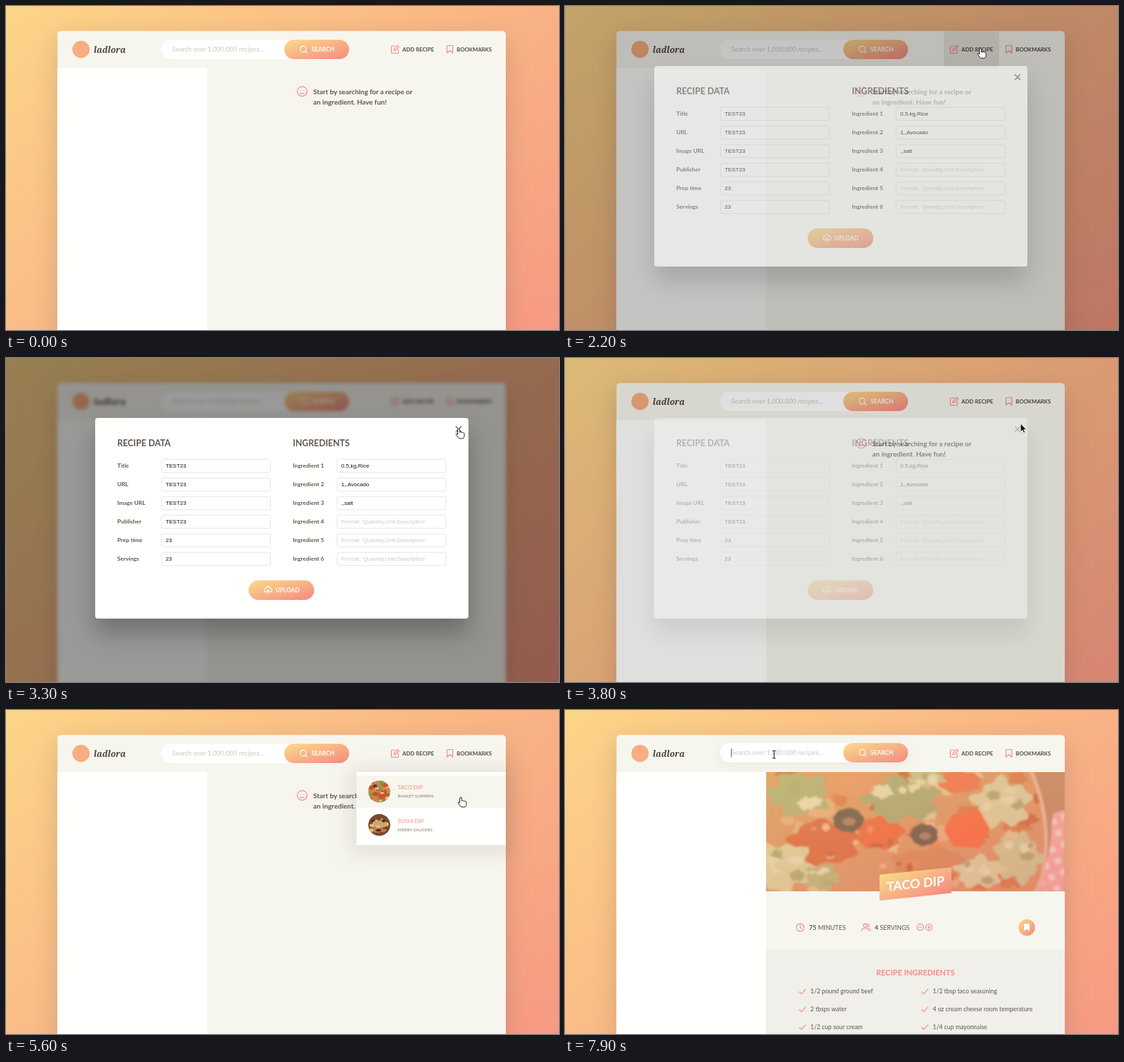
An HTML page for the animation above (8000 ms loop, 800x470 px).

```html
<!DOCTYPE html>
<html lang="en">
<head>
<meta charset="utf-8">
<title>Recipe search</title>
<style>
  html, body { margin: 0; width: 100%; height: 100%; overflow: hidden; }
  #stage { position: relative; width: 800px; height: 470px; overflow: hidden; }
  #page { position: absolute; width: 800px; height: 704px; background: linear-gradient(to right bottom, #fcd588, #f58d82); }
  svg, #veil { position: absolute; left: 0; top: 0; width: 800px; height: 470px; }
  #veil { background: rgba(0, 0, 0, .4); }
  text { font-family: Lato, "Open Sans", sans-serif; fill: #615551; white-space: pre; }
  .b { font-weight: 700; }
  .nav { font-weight: 700; fill: #544a46; }
  .w { fill: #fff; }
  .pink { fill: #f38e82; }
  .sub { font-size: 6.4px; fill: #857975; }
  .in { font: 8.1px "Liberation Sans", Arial, sans-serif; fill: #111; }
  .hint { fill: #c9c9c9; }
  .ic { fill: none; stroke: #f38e82; stroke-width: 1.2; stroke-linecap: round; stroke-linejoin: round; }
  .wi { stroke: #fff; }
  .card { filter: drop-shadow(0 11px 17px rgba(97, 85, 81, .24)); }
  .pop { filter: blur(13.5px); fill: rgba(97, 85, 81, .12); }
  .box { filter: drop-shadow(0 22px 17px rgba(0, 0, 0, .26)); }
</style>
</head>
<body>
<div id="stage">
  <div id="page">
    <svg viewBox="0 0 800 470">
      <defs>
        <linearGradient id="warm" x2="1" y2="1"><stop stop-color="#fbdb89"/><stop offset="1" stop-color="#f48982"/></linearGradient>
        <clipPath id="photoClip"><path d="M291 90H723V263H291Z"/></clipPath>
        <clipPath id="thumbClip"><circle r="16"/></clipPath>
        <filter id="soft"><feGaussianBlur stdDeviation="1.8"/></filter>
        <pattern id="check" width="18" height="18" patternUnits="userSpaceOnUse" patternTransform="rotate(-25)">
          <path fill="#f3d3cd" d="M0 0H18V18H0Z"/><path fill="#ea7f7d" opacity=".55" d="M0 0H9V18H0ZM0 0H18V9H0Z"/>
        </pattern>
      </defs>
      <rect class="card" x="74.5" y="36.3" width="648.5" height="632" rx="5" fill="#f7f6ee"/>
      <path fill="#fffffe" d="M74.500 90.300H291V470H74.500Z"/>

      <circle cx="108.5" cy="63" r="12.5" fill="#f8ad82"/>
      <text x="127" y="67.5" style="font:italic 700 12px 'Noto Serif',serif;fill:#4a403c">ladlora</text>

      <g id="form">
        <rect id="bar" x="224.3" y="49" width="272" height="28" rx="14" fill="#fff"/>
        <text x="240.5" y="66.2" font-size="9.5" style="fill:#d0c6c2">Search over 1,000,000 recipes...</text>
        <path id="caret" d="M240.7 57V69.500" stroke="#333" stroke-width=".8"/>
        <g id="go">
          <rect x="402.6" y="49" width="93.700" height="28" rx="14" fill="url(#warm)"/>
          <g class="ic wi"><circle cx="430" cy="62.500" r="4.300"/><path d="M433.200 65.700L435.600 68.100"/></g>
          <text class="b w" x="442" y="66.100" font-size="8.500">SEARCH</text>
        </g>
      </g>

      <path id="addBg" fill="#e9e5dc" d="M548 36.300H628V90.300H548Z"/>
      <path id="markBg" fill="#e9e5dc" d="M628 36.300H711V90.300H628Z"/>
      <path class="ic" d="M563 58H558.500Q557.500 58 557.500 59V67.500Q557.500 68.500 558.500 68.500H566.500Q567.500 68.500 567.500 67.500V63.500M561 65L561.500 62.700 566.500 57.300 568.600 59.300 563.500 64.500Z"/>
      <text class="nav" x="573.500" y="65.800" font-size="7.900">ADD RECIPE</text>
      <path class="ic" d="M638 68.300V58.300Q638 57.500 638.800 57.500H645.600Q646.400 57.500 646.400 58.300V68.300L642.200 64.800Z"/>
      <text class="nav" x="652" y="65.800" font-size="7.850">BOOKMARKS</text>

      <g id="hello">
        <g class="ic"><circle cx="428.500" cy="123.800" r="7"/><path d="M425.500 125.800Q428.500 129 431.500 125.800M426.300 121.600V121.700M430.700 121.600V121.700"/></g>
        <g class="b" font-size="10"><text x="444.500" y="127.900">Start by searching for a recipe or</text><text x="444.500" y="142.500">an ingredient. Have fun!</text></g>
      </g>

      <g id="spin" class="ic"><path d="M11 0A11 11 0 1 1 0 -11M0 -14.500L4 -11 0 -7.500"/></g>

      <g id="recipe">
        <g clip-path="url(#photoClip)">
          <path fill="#d58a5a" d="M291 90H723V263H291Z"/>
          <g id="photo" filter="url(#soft)"></g>
          <path fill="url(#warm)" opacity=".36" d="M291 90H723V263H291Z"/>
        </g>
        <path fill="#f0efe9" d="M291 347H723V470H291Z"/>
        <g transform="translate(507 252.300) skewY(-6)">
          <path fill="url(#warm)" d="M-52 -18.700H52V18.700H-52Z"/>
          <text class="b w" y="6.200" font-size="18.300" text-anchor="middle">TACO DIP</text>
        </g>
        <g class="ic">
          <circle cx="340.300" cy="315.500" r="5.600"/><path d="M340.300 312V315.500L342.600 316.800"/>
          <circle cx="434.300" cy="312.700" r="2.500"/><path d="M429.500 320.500V319.500Q429.500 317 432 317H436.500Q439 317 439 319.500V320.500M438 310.300Q440 310.800 440 312.700T438 315.100M440.500 317.200Q442 317.700 442 320.500"/>
          <circle cx="514" cy="315" r="4.700"/><circle cx="526.500" cy="315" r="4.700"/>
          <path d="M511.800 315H516.200M524.300 315H528.700M526.500 312.800V317.200"/>
        </g>
        <g font-size="9.100">
          <text x="353" y="318.600"><tspan class="b">75</tspan> MINUTES</text>
          <text x="448" y="318.600"><tspan class="b">4</tspan> SERVINGS</text>
        </g>
        <circle cx="668" cy="315.500" r="12" fill="url(#warm)"/>
        <path fill="#fff" d="M664 321V311Q664 310 665 310H671Q672 310 672 311V321L668 317.800Z"/>
        <text class="b pink" x="507" y="385" font-size="11.200" text-anchor="middle">RECIPE INGREDIENTS</text>
        <g id="list" font-size="8.850"></g>
      </g>
    </svg>

    <svg id="drop" viewBox="0 0 800 470">
      <path class="pop" d="M496 84H734V211H496Z"/>
      <path fill="#fffffe" d="M507 90H723V196H507Z"/>
      <g id="first">
        <path id="firstBg" fill="#f7f6ee" d="M507 96H723V143H507Z"/>
        <g id="taco" transform="translate(540 119.300)" clip-path="url(#thumbClip)"></g>
        <text class="pink" x="566.500" y="116" font-size="8">TACO DIP</text>
        <text class="sub" x="566.500" y="128">BASKET SUPPERS</text>
      </g>
      <g id="sushi" transform="translate(540 166.800)" clip-path="url(#thumbClip)"></g>
      <text class="pink" x="566.500" y="163.800" font-size="8">SUSHI DIP</text>
      <text class="sub" x="566.500" y="175.500">MERRY SAUCERS</text>
    </svg>
  </div>

  <div id="veil"></div>

  <svg id="modal" viewBox="0 0 800 470">
    <rect class="box" x="129" y="87" width="540" height="291" rx="4" fill="#fffffe"/>
    <path class="ic" style="stroke:#555" d="M651 99.500L658.500 107M658.500 99.500L651 107"/>
    <g class="b" font-size="12.500"><text x="161" y="127.600">RECIPE DATA</text><text x="415" y="127.600">INGREDIENTS</text></g>
    <g id="fields"></g>
    <rect x="351" y="322.500" width="95" height="28.500" rx="14.200" fill="url(#warm)"/>
    <path class="ic wi" d="M376.300 339.800Q373 339 373.500 336.200 374 334 376.200 334 377 331.500 379.700 331.700 382.300 332 382.800 334.800 385 335.300 384.800 337.500 384.500 339.700 382 339.800M379.200 342V336.500M377 338.500L379.200 336.300 381.400 338.500"/>
    <text class="b w" x="390" y="340.100" font-size="8.500">UPLOAD</text>
  </svg>

  <svg viewBox="0 0 800 470">
    <g id="tip"><path fill="#0b0b0b" d="M0 458H51Q54 458 54 461V470H0Z"/><text x="1" y="467.200" style="font:8.300px 'Open Sans',sans-serif;fill:#eee">4fa19be03d7a</text></g>
    <g id="cursor">
      <path id="arrow" fill="#111" stroke="#fff" stroke-width=".8" d="M0 0V12L2.800 9.400 4.600 13.400 6.600 12.500 4.800 8.600H8.600Z"/>
      <path id="hand" fill="#fff" stroke="#222" d="M-1.500 8V1A1.400 1.400 0 0 1 1.300 1V5C1.700 4.200 3.700 4.200 3.900 5.200 4.400 4.500 5.900 4.600 6.100 5.600 6.700 5.100 8 5.400 8 6.600V9.500C8 12.100 6.700 13.800 4.800 13.800H2C.3 13.800 -.8 12.600 -1.800 11L-3.800 8.200C-4.500 7 -3 6 -2.100 7Z"/>
      <path id="beam" fill="none" stroke="#333" stroke-width="1.200" d="M-2.500 -5.500H-1Q0 -5.500 0 -4.500V4.500Q0 5.500 -1 5.500H-2.500M2.500 -5.500H1Q0 -5.500 0 -4.500V4.500Q0 5.500 1 5.500H2.500"/>
    </g>
  </svg>
</div>

<script>
const $ = id => document.getElementById(id);
const LOOP = 8000, STEP = 100;

// Irregular rounded shape; jag sets how leafy its edge is
function blob(x, y, rx, ry, color, jag = .06) {
  let d = '';
  for (let i = 0; i < 40; i++) {
    const a = i * Math.PI / 20;
    const r = 1 + jag * (Math.sin(5 * a + x) + Math.sin(9 * a + y));
    d += (i ? 'L' : 'M') + (x + rx * r * Math.cos(a)).toFixed(1) + ' ' + (y + ry * r * Math.sin(a)).toFixed(1);
  }
  return `<path fill="${color}" d="${d}Z"/>`;
}
let seed = 7;
const rnd = () => (seed = seed * 16807 % 2147483647) / 2147483647;
function scatter(n, x, y, w, h, size, colors) {
  let out = '';
  for (let i = 0; i < n; i++)
    out += blob(x + w * rnd(), y + h * rnd(), size * (.5 + rnd()), size * (.4 + rnd() * .6), colors[i % colors.length], .12);
  return out;
}
const pale = '#d3cf9d', red = '#e8542c', dark = '#4b3f38';
// A lettuce leaf: ragged outline with softer patches of light and shade
const leaf = (x, y, rx, ry, color) => blob(x, y, rx, ry, color, .13) +
  scatter(7, x - rx * .6, y - ry * .6, rx * 1.2, ry * 1.2, rx * .22, ['#e0dcb5', '#9aa268', color]);
const olive = (x, y, r) => blob(x, y, r, r * .8, dark, .03) + blob(x + 1, y + 2, r * .42, r * .26, '#94695a', .03);

$('photo').innerHTML =
  scatter(48, 291, 90, 400, 173, 15, ['#cf6a38', '#e2a477', '#c0562f', '#dcc08e']) +
  blob(375, 192, 50, 32, '#d2532e', .08) + blob(415, 107, 36, 20, '#e0895a') + blob(455, 178, 34, 24, red, .08) +
  blob(570, 104, 32, 16, '#e9603a') + blob(530, 222, 55, 22, '#d07a4c', .1) +
  scatter(14, 345, 165, 190, 65, 7, ['#f0b08a', '#b8492a', '#e87a4c']) +
  leaf(338, 122, 42, 30, '#9fa56f') + leaf(314, 228, 44, 34, pale) + leaf(372, 243, 24, 18, '#aab073') +
  leaf(632, 135, 40, 34, pale) + leaf(655, 215, 34, 34, '#c3c48d') + leaf(600, 235, 34, 22, pale) +
  leaf(488, 130, 52, 30, '#95a06c') + leaf(522, 99, 26, 12, '#b9bc86') +
  '<path fill="#f4562d" d="M560 152L600 146 615 172 600 200 562 198 548 174Z"/>' +
  olive(410, 160, 22) + olive(520, 181, 20) +
  '<path fill="#b67b58" d="M676 90Q712 175 684 263H723V90Z"/>' +
  '<path fill="url(#check)" d="M706 150L723 145V263H678Q700 222 703 185Z"/>' +
  '<path fill="none" stroke="#e0b598" stroke-width="5" d="M674 88Q712 175 684 265"/>';

$('taco').innerHTML = '<circle r="16" fill="#c98a4c"/>' +
  scatter(30, -15, -15, 30, 30, 3.5, ['#7f9a45', '#df4a2c', '#e3c489', '#b85b30']) + olive(-6, -8, 3);
$('sushi').innerHTML = '<circle r="16" fill="#7a4a2e"/>' + blob(1, -1, 12, 6, '#d2a468') +
  blob(-2, 7, 13, 4, '#b77c46') + scatter(14, -12, -14, 24, 26, 2.5, ['#e0bd86', '#4d2f20']);

const foods = [
  ['1/2 pound ground beef', '1/2 tbsp taco seasoning'],
  ['2 tbsps water', '4 oz cream cheese room temperature'],
  ['1/2 cup sour cream', '1/4 cup mayonnaise']];
$('list').innerHTML = foods.map((row, r) => row.map((food, c) => {
  const x = 355 + 177 * c, y = 411.4 + 25.7 * r;
  return `<path class="ic" d="M${x - 16} ${y - 2.5}l3 3 6-6.500"/><text x="${x}" y="${y}">${food}</text>`;
}).join('')).join('');

function field(x, row, label, value, hint) {
  const y = 147 + 27 * row;
  return `<text class="b" font-size="8.400" x="${x}" y="${y + 12.4}">${label}</text>
    <rect x="${x + 64}" y="${y}" width="157.500" height="19" rx="2.500" fill="#fff" stroke="#ddd" stroke-width=".8"/>
    <text class="in ${hint ? 'hint' : ''}" x="${x + 70}" y="${y + 12.4}">${value}</text>`;
}
const labels = ['Title', 'URL', 'Image URL', 'Publisher', 'Prep time', 'Servings'];
const items = ['0.5,kg,Rice', '1,,Avocado', ',,salt'];
$('fields').innerHTML = labels.map((label, i) =>
  field(161, i, label, i < 4 ? 'TEST23' : '23') +
  field(415, i, 'Ingredient ' + (i + 1), items[i] || "Format: 'Quantity,Unit,Description'", !items[i])).join('');

// The CSS "ease" curve
function ease(p) {
  let lo = 0, hi = 1;
  for (let i = 0; i < 20; i++) {
    const s = (lo + hi) / 2;
    if (.75 * s * (1 - s) + s ** 3 < p) lo = s; else hi = s;
  }
  return .3 * lo * (1 - lo) ** 2 + 3 * lo * lo * (1 - lo) + lo ** 3;
}
const ramp = (t, a, b) => t <= a ? 0 : t >= b ? 1 : ease((t - a) / (b - a));
const pulse = (t, on, off, len) => ramp(t, on, on + len) - ramp(t, off, off + len);

// time, x, y, pointer shape from then on
const path = [
  [200, 692, 164, 'arrow'], [300, 540, 148, 'arrow'], [400, 340, 98, 'arrow'], [500, 250, 66, 'beam'],
  [600, 418, 64, 'hand'], [700, 474, 63, 'hand'], [800, 474, 63, 'hand'], [1000, 487, 69, 'hand'],
  [1100, 487, 69, 'arrow'], [1400, 640, 72, 'hand'], [1550, 666, 67, 'hand'], [1700, 655, 66, 'hand'],
  [2000, 601, 62, 'hand'], [2250, 601, 62, 'arrow'], [2800, 666, 103, 'hand'], [3000, 666, 103, 'hand'],
  [3300, 655, 103, 'hand'], [3700, 655, 103, 'arrow'], [4100, 671, 72, 'arrow'], [4200, 672, 67, 'hand'],
  [4500, 676, 66, 'hand'], [5000, 676, 66, 'hand'], [5600, 658, 127, 'hand'], [6600, 658, 127, 'hand'],
  [6900, 500, 132, 'arrow'], [7100, 287.5, 126, 'arrow'], [7300, 266, 138, 'arrow'], [7600, 292, 76, 'beam'],
  [7800, 302.5, 64.5, 'beam'], [8000, 302.5, 64.5, 'beam']];

function pointer(t) {
  $('cursor').style.display = t < 200 ? 'none' : '';
  if (t < 200) return;
  const i = path.findIndex(k => k[0] > t), [t0, x0, y0, kind] = path[i - 1], [t1, x1, y1] = path[i];
  const p = (t - t0) / (t1 - t0);
  $('cursor').setAttribute('transform', `translate(${x0 + (x1 - x0) * p} ${y0 + (y1 - y0) * p})`);
  for (const id of ['arrow', 'hand', 'beam']) $(id).style.display = id === kind ? '' : 'none';
}

function fade(id, v) {
  $(id).style.opacity = v;
  $(id).style.display = v > 0 ? '' : 'none';
}

function draw(t) {
  const veil = pulse(t, 2030, 3600, 500);
  fade('veil', veil);
  fade('modal', veil);
  $('veil').style.backdropFilter = `blur(${2.6 * veil ** 4}px)`;
  fade('drop', .5 * pulse(t, 1500, 1780, 260) + pulse(t, 4400, 7180, 500));
  fade('addBg', pulse(t, 1800, 2300, 200));
  fade('markBg', pulse(t, 1350, 1750, 200) + pulse(t, 4150, 5250, 250));
  fade('firstBg', ramp(t, 5250, 5500));
  fade('tip', pulse(t, 5640, 7150, 150));
  fade('hello', +(t < 5900));
  fade('spin', +(t >= 5900 && t < 6400));
  fade('recipe', +(t >= 6400));
  fade('caret', +(t >= 7800));

  const lift = ramp(t, 7650, 7850);
  $('form').setAttribute('transform', `translate(0 ${-lift})`);
  $('bar').style.filter = lift ? `drop-shadow(0 4px 8px rgba(97,85,81,${.08 * lift}))` : '';
  const grow = 1 + .05 * pulse(t, 550, 1150, 150);
  $('go').setAttribute('transform', `translate(449.5 63) scale(${grow}) translate(-449.5 -63)`);
  $('first').setAttribute('transform', `translate(0 ${-pulse(t, 5250, 6700, 250)})`);
  $('spin').setAttribute('transform', `translate(507 133) rotate(${(t - 5900) * .18})`);
  pointer(t);
}

function tick(now) {
  draw(Math.floor(now % LOOP / STEP) * STEP);
  requestAnimationFrame(tick);
}
draw(0);
requestAnimationFrame(tick);
</script>
</body>
</html>
```
